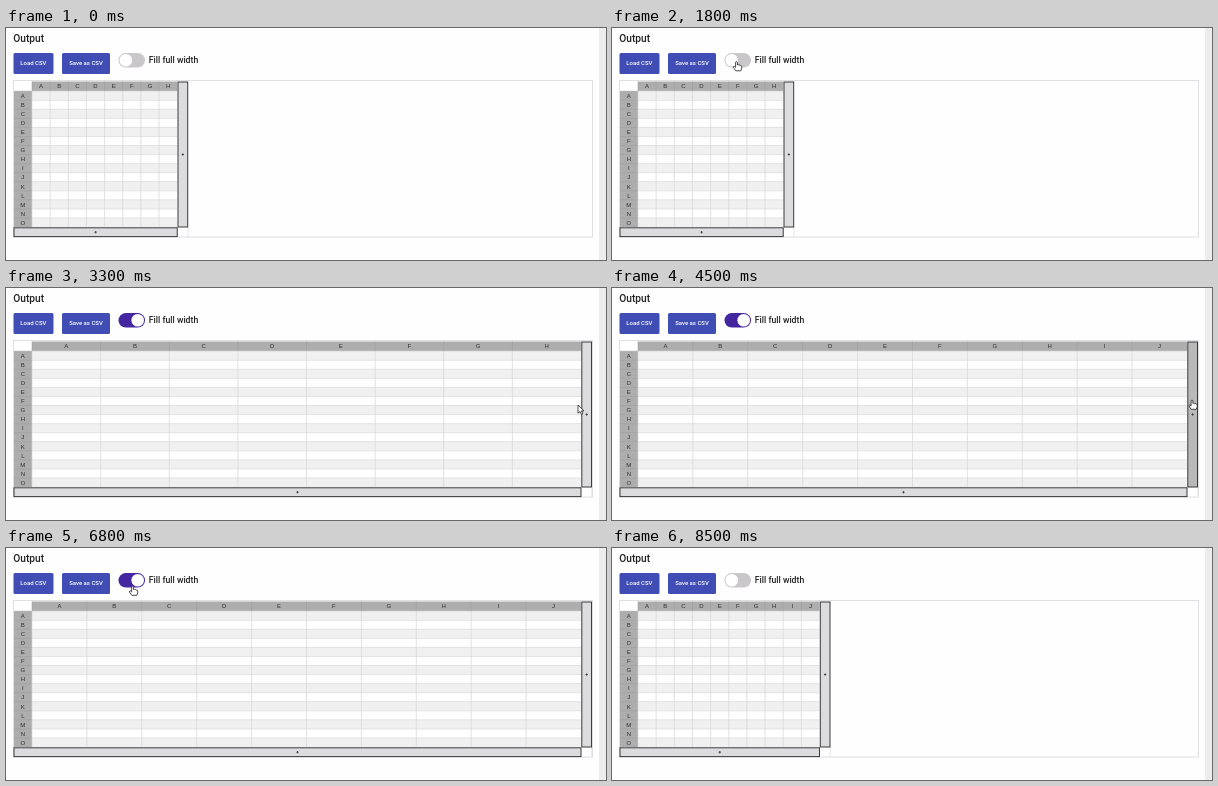
An HTML page for the animation above (8700 ms loop, 600 px wide and 232 px high).

```html
<!DOCTYPE html>
<html lang="en">
<head>
<meta charset="utf-8">
<title>Fill full width</title>
<style>
html, body { margin: 0; width: 100%; height: 100%; overflow: hidden; background: #fefefe; }
svg { display: block; width: 600px; height: 232px; }
.ui { font-family: Roboto, sans-serif; font-weight: 500; }
.cell { font: 6px "Liberation Sans", Arial, sans-serif; fill: #2c2c2c; text-anchor: middle; }
</style>
</head>
<body>
<svg viewBox="0 0 600 232">
  <rect width="600" height="232" fill="#fefefe"/>
  <rect x="593" width="7" height="232" fill="#ededee"/>
  <g class="ui">
    <text x="7.2" y="13.8" font-size="10.2" fill="#222">Output</text>
    <g fill="#3f4db5">
      <rect x="7.5" y="25" width="40" height="21" rx="1.5"/>
      <rect x="56" y="25" width="48" height="21" rx="1.5"/>
    </g>
    <g font-size="6" fill="#fff" text-anchor="middle">
      <text x="27.4" y="37.4">Load CSV</text>
      <text x="80" y="37.4">Save as CSV</text>
    </g>
    <text x="142.8" y="35" font-size="8.7" fill="#222">Fill full width</text>
  </g>
  <rect id="track" x="112.5" y="25" width="26.5" height="14.6" rx="7.3"/>
  <circle id="knob" cy="32.3" r="6.3" fill="#fff"/>
  <rect x="7.5" y="52.5" width="579" height="156.5" fill="none" stroke="#dfdfe4"/>
  <g id="table"></g>
  <g id="cursor"></g>
</svg>
<script>
const LOOP = 8700, STEP = 100;
const LEFT = 8, TOP = 53.5, BODY_X = 26, BODY_Y = 63.2, BOTTOM = 199, ROWS = 15;
const ROW_H = (BOTTOM - BODY_Y) / ROWS;
const FILL_ON = 2000, FILL_OFF = 7000, ADD_COLUMN = [3700, 4100];

// time, x, y of the pointer tip
const path = [
  [100, 284, 150], [400, 215, 190], [600, 150, 203], [900, 165, 203],
  [1000, 177, 186], [1200, 177, 125], [1700, 124.5, 33.5], [2200, 124.5, 33.5],
  [2400, 165, 52], [2800, 420, 94], [3200, 561, 115], [3300, 572, 117],
  [3500, 580, 114], [4500, 580, 112], [4700, 580, 112], [5100, 480, 116],
  [5600, 350, 103], [5800, 299.5, 89.5], [6300, 160, 54], [6600, 126.5, 38],
  [7300, 126.5, 38], [7500, 150, 44], [7800, 565, 68], [7900, 604, 72]
];

const shapes = {
  arrow: '<path d="M0 0V8.2L2 6.5L3.4 9.3L4.8 8.6L3.4 5.9H6Z" fill="#fff" stroke="#222" stroke-width=".8"/>',
  hand: '<path d="M-.9 .6Q0-.5 .9 .6V3.4Q1.8 2.8 2.4 3.6Q3.5 3.1 4 4.1Q5 3.8 5.2 5V7L4.3 9.3H-.7L-3.1 5.9Q-3.2 4.7-2.1 4.9L-.9 5.9Z" fill="#fff" stroke="#222" stroke-width=".8"/>',
  beam: '<path d="M-2.3-4H2.3M-2.3 4H2.3M0-4V4" fill="none" stroke="#333" stroke-width="1.1"/>'
};

const $ = id => document.getElementById(id);
const clamp = v => Math.max(0, Math.min(1, v));
const letter = i => String.fromCharCode(65 + i);
const rect = (x, y, w, h, fill, extra = '') =>
  `<rect x="${x}" y="${y}" width="${w}" height="${h}" fill="${fill}" ${extra}/>`;
const line = (x1, y1, x2, y2, color, width = .7) =>
  `<path d="M${x1} ${y1}L${x2} ${y2}" stroke="${color}" stroke-width="${width}"/>`;
const label = (x, y, s) => `<text class="cell" x="${x}" y="${y}">${s}</text>`;

function pointer(t) {
  const i = path.findIndex(p => p[0] > t);
  if (i < 1) return null;
  const [t0, x0, y0] = path[i - 1], [t1, x1, y1] = path[i];
  const k = (t - t0) / (t1 - t0);
  return { x: x0 + (x1 - x0) * k, y: y0 + (y1 - y0) * k };
}

function bar(x, y, w, h, hover) {
  const cx = x + w / 2, cy = y + h / 2;
  return rect(x, y, w, h, hover ? '#b9b9b9' : '#dcdcde', 'stroke="#3a3a3a" stroke-width="1"') +
    line(cx - 1.2, cy, cx + 1.2, cy, '#222') + line(cx, cy - 1.2, cx, cy + 1.2, '#222');
}

function table(cols, right, hover) {
  const colW = (right - BODY_X) / cols;
  let s = rect(LEFT, TOP, BODY_X - LEFT, BODY_Y - TOP, '#fff') +
    rect(BODY_X, TOP, right - BODY_X, BODY_Y - TOP, '#adadad') +
    rect(LEFT, BODY_Y, BODY_X - LEFT, BOTTOM - BODY_Y, '#adadad');
  for (let r = 0; r < ROWS; r++) {
    const y = BODY_Y + r * ROW_H;
    s += rect(BODY_X, y, right - BODY_X, ROW_H, r % 2 ? '#fefefe' : '#f0f0f1') +
      line(BODY_X, y, right, y, '#dadadc') +
      line(LEFT, y, BODY_X, y, '#9b9b9b', .5) +
      label(16.8, y + 6.8, letter(r));
  }
  for (let c = 0; c < cols; c++) {
    const x = BODY_X + c * colW;
    s += line(x, TOP, x, BODY_Y, '#9b9b9b', .5) +
      line(x, BODY_Y, x, BOTTOM, '#d6d6d9') +
      label(x + colW / 2, 60.4, letter(c));
  }
  return s + line(right + 10.8, BOTTOM, right + 10.8, 209, '#dfdfe4') +
    bar(right + .8, 54, 9.7, 145, hover === 'right') +
    bar(LEFT, 199.8, right - LEFT, 8.8, hover === 'bottom');
}

function hit(p, right) {
  const inside = (x0, y0, x1, y1) => p.x >= x0 && p.x <= x1 && p.y >= y0 && p.y <= y1;
  if (inside(right + .5, 54, right + 11, 199)) return 'right';
  if (inside(LEFT, 199.5, right, 209)) return 'bottom';
  if (inside(112, 25, 139, 40)) return 'toggle';
  if (inside(BODY_X, BODY_Y, right - 5, BOTTOM)) return 'cell';
  return '';
}

function draw(t) {
  const wide = t >= FILL_ON && t < FILL_OFF;
  const cols = 8 + ADD_COLUMN.filter(a => t >= a).length;
  const right = wide ? 575 : BODY_X + cols * 18.15;
  const p = pointer(t), over = p ? hit(p, right) : '';
  const on = clamp((t - FILL_ON) / 150) - clamp((t - FILL_OFF) / 150);

  $('track').setAttribute('fill', wide ? '#4326a0' : '#c9c7ca');
  $('knob').setAttribute('cx', 119.8 + 11.9 * on);
  $('table').innerHTML = table(cols, right, over);

  const kind = over === 'cell' ? 'beam' : over ? 'hand' : 'arrow';
  $('cursor').innerHTML = p ? `<g transform="translate(${p.x} ${p.y})">${shapes[kind]}</g>` : '';
}

const start = performance.now();
let last = -1;
function tick() {
  const now = Math.max(0, performance.now() - start) % LOOP;
  const t = Math.floor(now / STEP) * STEP;
  if (t !== last) draw(last = t);
  requestAnimationFrame(tick);
}
tick();
</script>
</body>
</html>
```
